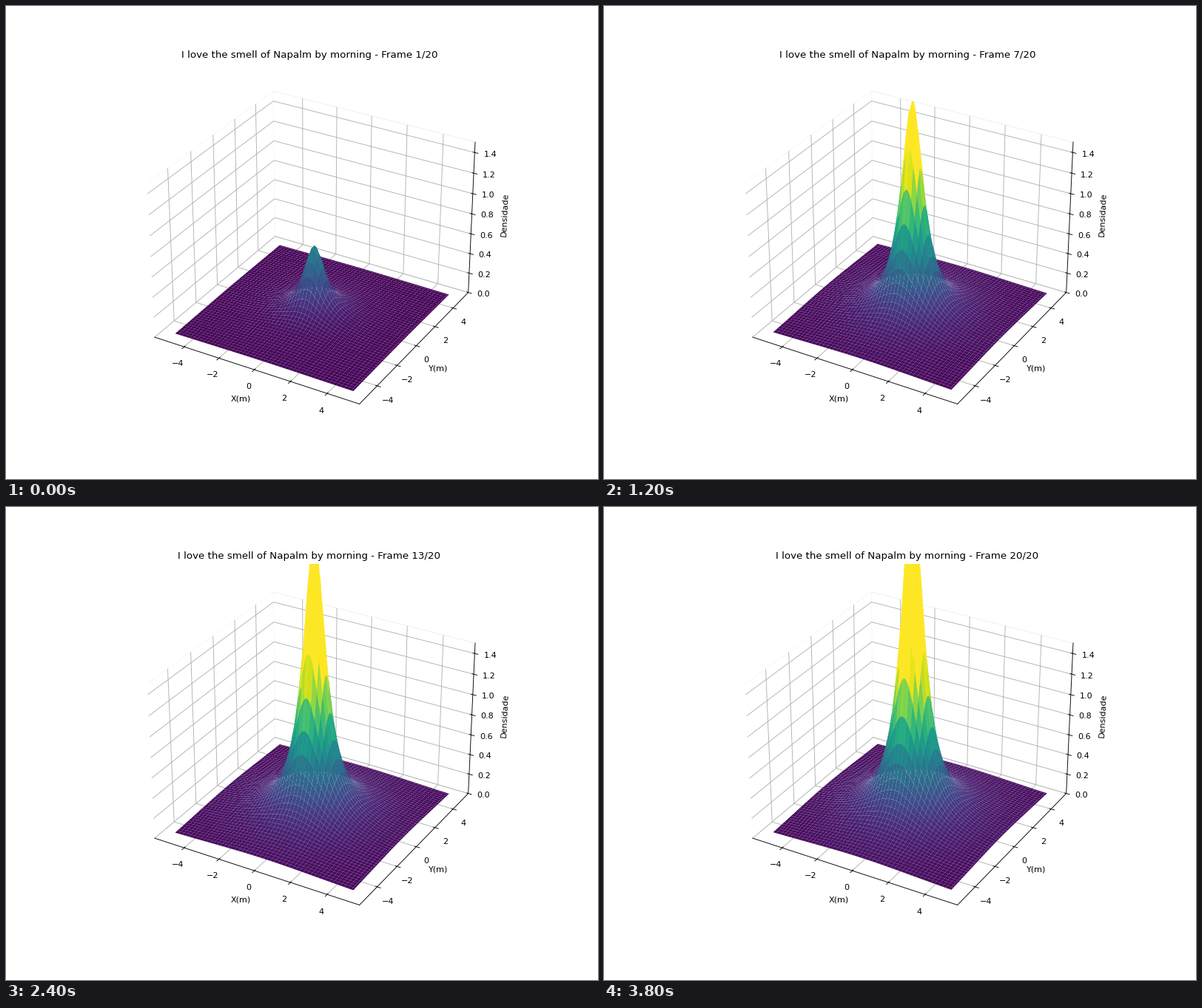
Write a matplotlib script that moves like this. It is 800 px wide and 640 px high and loops after 4 s.

```python
import numpy as np
import matplotlib.pyplot as plt
from matplotlib.animation import FuncAnimation

STEPS = 20
HALF = 5
Z_MAX = 1.5
# 5 % data margin plus the 1/48 view margin on each side
LIMIT = HALF * 1.1 * (1 + 1 / 24)

x = np.linspace(-HALF, HALF, 100)
X, Y = np.meshgrid(x, x)
profile = 1 / (1 + 2 * (X**2 + Y**2))

fig = plt.figure(figsize=(10, 8), dpi=80, facecolor="white")
ax = fig.add_subplot(111, projection="3d")
ax.set_xlim(-LIMIT, LIMIT)
ax.set_ylim(-LIMIT, LIMIT)
ax.set_zlim(0, Z_MAX)
ax.set_xlabel("X(m)")
ax.set_ylabel("Y(m)")
ax.set_zlabel("Densidade")
for axis in (ax.xaxis, ax.yaxis, ax.zaxis):
    axis.pane.fill = False


def density(t):
    return np.log(1 + t) * profile


def update(i):
    for surface in list(ax.collections):
        surface.remove()
    ax.plot_surface(X, Y, density(i + 1), cmap="viridis", vmin=0, vmax=Z_MAX)
    ax.set_title(f"I love the smell of Napalm by morning - Frame {i + 1}/{STEPS}")
    return ax.collections


anim = FuncAnimation(fig, update, frames=STEPS, interval=200, repeat=True)
plt.show()
```
